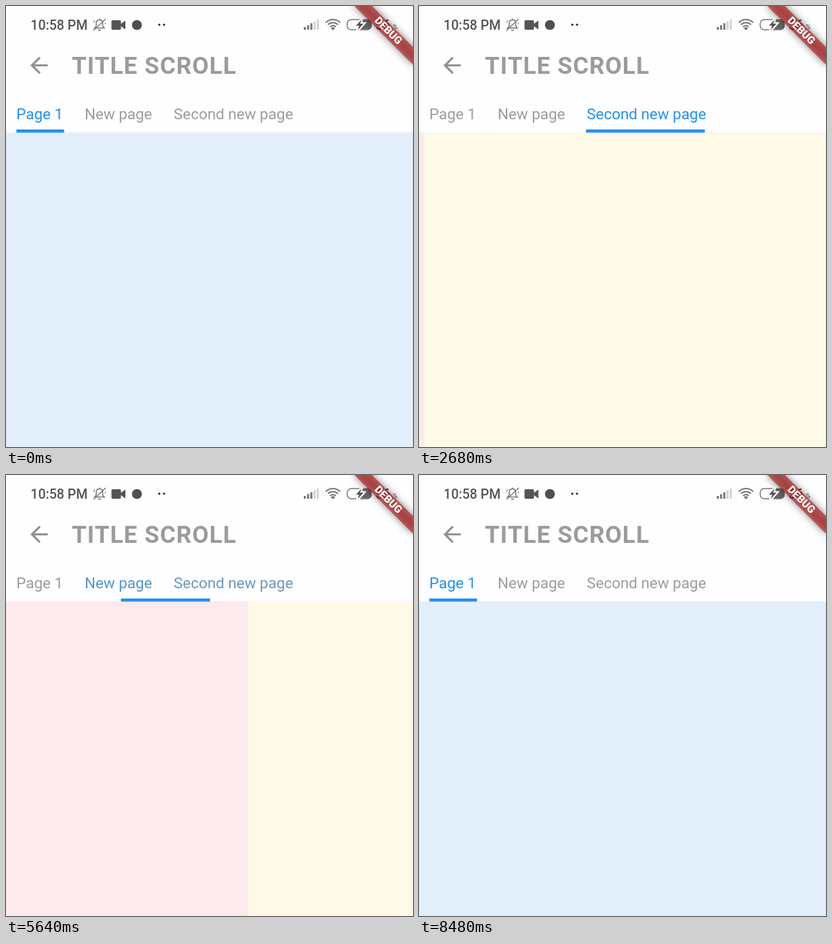
An HTML page with a canvas that plays this animation: 600x650 px, repeating every 8520 ms.

```html
<!DOCTYPE html>
<html lang="en">
<head>
<meta charset="utf-8">
<title>Title scroll</title>
<style>
html, body { margin: 0; width: 100%; height: 100%; overflow: hidden; background: #fefdff; }
canvas { display: block; }
</style>
</head>
<body>
<canvas id="stage" width="600" height="650"></canvas>
<script>
const ctx = document.getElementById('stage').getContext('2d');
const LOOP = 8520, STEP = 40;
const HEADER = 186.5;
const GREY = [156, 156, 157], BLUE = [33, 146, 234];
const PAGES = ['#e2effb', '#fdeaec', '#fffae7'];
const TABS = [
  { label: 'Page 1', x: 15.2, left: 15.3, right: 85.6 },
  { label: 'New page', x: 116, left: 116.4, right: 217.3 },
  { label: 'Second new page', x: 247.3, left: 247.7, right: 423.8 }
];
// Each swipe follows the finger, then settles on the next page.
const SWIPES = [
  { start: 520, drag: 400, to: 1 },
  { start: 1786, drag: 400, to: 2 },
  { start: 2653, drag: 400, to: 1 },
  { start: 3700, drag: 410, to: 0 },
  { start: 4600, drag: 300, to: 1 },
  { start: 5389, drag: 250, to: 2 },
  { start: 6600, drag: 400, to: 1 },
  { start: 7710, drag: 320, to: 0 }
];
const SETTLE = 420, DRAGGED = 0.4;

const lerp = (a, b, k) => a + (b - a) * k;

function swipeProgress(time, drag) {
  if (time <= 0) return 0;
  if (time < drag) return DRAGGED * (time / drag) ** 1.3;
  const k = Math.min(1, (time - drag) / SETTLE);
  return 1 - (1 - DRAGGED) * (1 - k) ** 3;
}

function pageAt(time) {
  let page = 0;
  for (const { start, drag, to } of SWIPES) {
    if (time > start) page = lerp(page, to, swipeProgress(time - start, drag));
  }
  return page;
}

function rect(color, x, y, w, h) {
  ctx.fillStyle = color;
  ctx.fillRect(x, y, w, h);
}

function text(string, x, y, size, weight, color, spacing = 0) {
  ctx.font = `${weight} ${size}px Roboto, sans-serif`;
  ctx.letterSpacing = spacing + 'px';
  ctx.fillStyle = color;
  ctx.fillText(string, x, y);
}

function fillPath(color, d) {
  ctx.fillStyle = color;
  ctx.fill(new Path2D(d));
}

function strokePath(color, width, d) {
  ctx.strokeStyle = color;
  ctx.lineWidth = width;
  ctx.stroke(new Path2D(d));
}

function disc(color, x, y, r) {
  ctx.fillStyle = color;
  ctx.beginPath();
  ctx.arc(x, y, r, 0, Math.PI * 2);
  ctx.fill();
}

function drawWifi() {
  const x = 482, y = 35;
  ctx.strokeStyle = '#777';
  ctx.lineWidth = 2.1;
  for (const r of [6, 10.5, 15]) {
    ctx.beginPath();
    ctx.arc(x, y, r, -Math.PI * 0.75, -Math.PI * 0.25);
    ctx.stroke();
  }
  fillPath('#777', 'M482 36 L478.8 32.4 Q482 30 485.2 32.4 Z');
}

function drawBattery() {
  ctx.strokeStyle = '#777';
  ctx.lineWidth = 1.5;
  ctx.beginPath();
  ctx.roundRect(503, 20, 35.5, 15, 6);
  ctx.stroke();
  ctx.fillStyle = '#666';
  ctx.beginPath();
  ctx.roundRect(521, 20.5, 18, 14, [0, 5, 5, 0]);
  ctx.fill();
  const bolt = 'M524 20 L516 29 H520.5 L518.5 35.5 L527 26 H522 Z';
  strokePath('#fefdff', 4.5, bolt);
  fillPath('#555', bolt);
}

function drawStatusBar() {
  text('10:58 PM', 36.3, 35, 19.5, 500, '#555');

  const bell = 'M130.5 32.5 H145 L142.5 29.5 V25 Q142.5 20.5 137.8 20.5 Q133 20.5 133 25 V29.5 Z';
  strokePath('#777', 1.5, bell + ' M136 35 Q137.8 37 139.6 35 M137.8 20.5 V18.5 M129 36 L147 19');
  strokePath('#888', 1.2, 'M129.2 25 Q129.5 22.5 131.2 21 M146.4 27 V24.5');

  ctx.fillStyle = '#555';
  ctx.beginPath();
  ctx.roundRect(155.5, 21, 14, 14, 1.8);
  ctx.fill();
  fillPath('#555', 'M169 26.5 L176 21.5 V34.5 L169 29.5 Z');

  disc('#505050', 193, 28, 7.3);
  disc('#222', 226, 27.5, 1.6);
  disc('#222', 233, 27.5, 1.6);

  for (let i = 0; i < 5; i++) {
    const h = 4 + i * 2.8;
    rect(i < 3 ? '#777' : '#d2d2d2', 439 + i * 4.8, 35 - h, 3, h);
  }
  drawWifi();
  drawBattery();
  text('56', 544.5, 34.5, 19.5, 500, '#333');
  text('%', 570.5, 34, 9, 500, '#666');
}

function drawTabs(page) {
  TABS.forEach((tab, i) => {
    const active = Math.max(0, 1 - Math.abs(page - i));
    const rgb = GREY.map((c, n) => Math.round(lerp(c, BLUE[n], active)));
    text(tab.label, tab.x, 167, 22.4, 400, `rgb(${rgb})`);
  });
  const i = Math.min(1, Math.floor(page)), k = page - i;
  const left = lerp(TABS[i].left, TABS[i + 1].left, k);
  const right = lerp(TABS[i].right, TABS[i + 1].right, k);
  rect('#2490ee', left, 182, right - left, 4.6);
}

function drawRibbon() {
  const unit = 1.528, half = 40 * unit, top = 28 * unit, height = 12 * unit;
  const away = 2000;
  const corner = x => {
    ctx.save();
    ctx.translate(x, 0);
    ctx.rotate(Math.PI / 4);
  };
  // Only the blurred shadow of this strip lands on the stage.
  corner(600 - away);
  ctx.shadowColor = 'rgba(0,0,0,.5)';
  ctx.shadowBlur = 12;
  ctx.shadowOffsetX = away;
  rect('#000', -half, top, half * 2, height);
  ctx.restore();

  corner(600);
  rect('rgba(183,28,28,.627)', -half, top, half * 2, height);
  ctx.textAlign = 'center';
  text('DEBUG', 0, top + 9 * unit, 10.2 * unit, 900, '#fff');
  ctx.restore();
}

function draw(time) {
  const page = pageAt(time);
  rect('#fefdff', 0, 0, 600, 650);
  PAGES.forEach((color, i) => rect(color, (i - page) * 600, HEADER, 600, 650 - HEADER));
  rect('rgba(0,0,0,.025)', 0, 186, 600, 1);

  drawStatusBar();
  ctx.save();
  ctx.translate(29.6, 68.3);
  ctx.scale(1.6, 1.6);
  fillPath('#929292', 'M20 11H7.83l5.59-5.59L12 4l-8 8 8 8 1.41-1.41L7.83 13H20z');
  ctx.restore();
  text('TITLE SCROLL', 97, 99.5, 35.2, 700, '#9b9b9c', 1.05);
  drawTabs(page);
  drawRibbon();
}

function tick() {
  const time = performance.now() % LOOP;
  draw(Math.floor(time / STEP) * STEP);
  requestAnimationFrame(tick);
}
tick();
</script>
</body>
</html>
```
